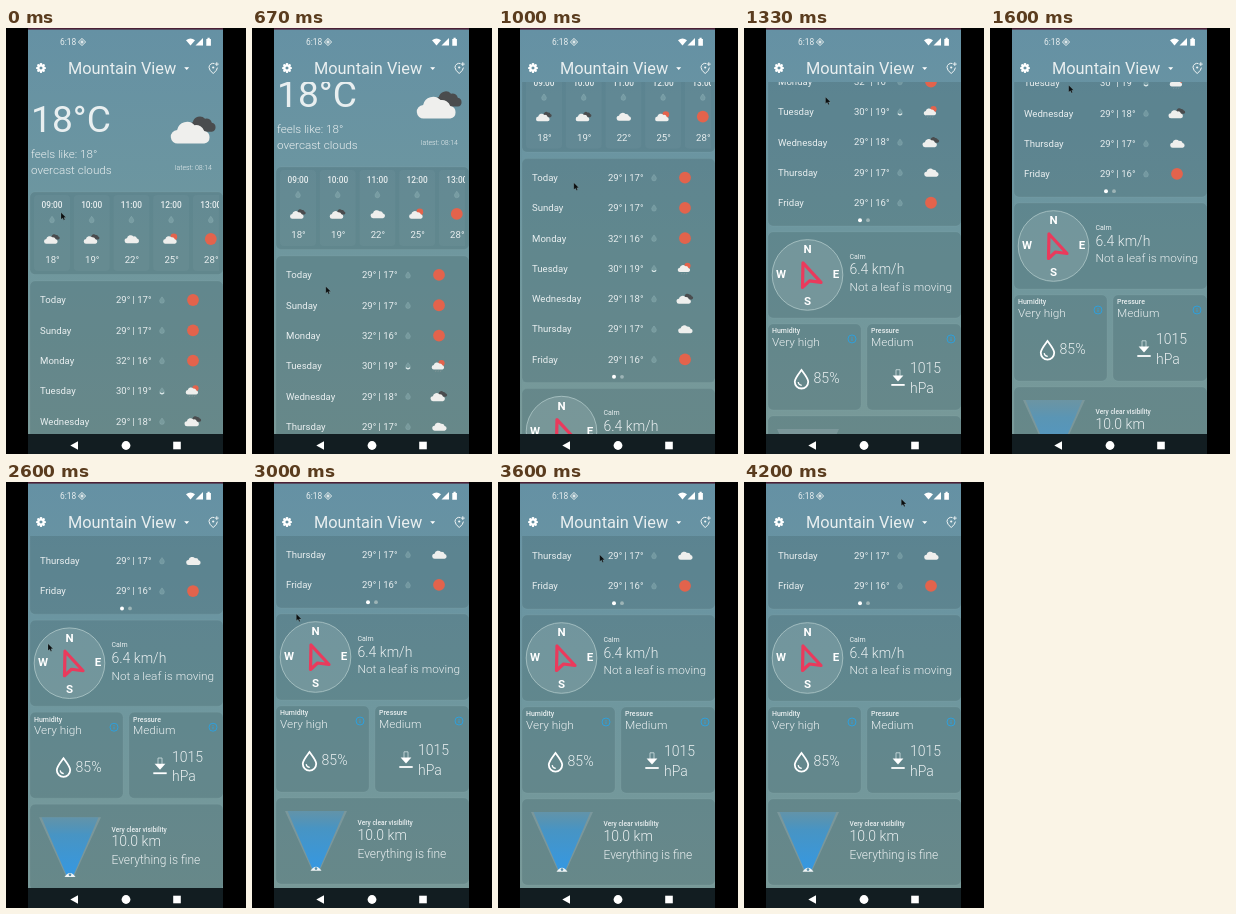
Animation of 240x426 px, one loop 4.27 s. Source, as an HTML page:

```html
<!DOCTYPE html>
<html lang="en">
<head>
<meta charset="utf-8">
<title>Weather</title>
<style>
html, body { margin: 0; width: 100%; height: 100%; overflow: hidden; background: #000; }
svg { display: block; width: 100vw; height: 100vh; }
text { font-family: Roboto, "Open Sans", sans-serif; fill: #e9eff0; white-space: pre; }
.card { fill: #3f6068; fill-opacity: .3; stroke: #a5c4c4; stroke-opacity: .12; stroke-width: .8; }
</style>
</head>
<body>
<svg viewBox="0 0 240 426" preserveAspectRatio="none">
  <defs>
    <linearGradient id="sky" x1="0" y1="0" x2="0" y2="1">
      <stop offset="0" stop-color="#6591a4"/>
      <stop offset=".5" stop-color="#6e979f"/>
      <stop offset="1" stop-color="#789998"/>
    </linearGradient>
    <linearGradient id="beam" x1="0" y1="0" x2="0" y2="1">
      <stop offset="0" stop-color="#4a90b8" stop-opacity=".5"/>
      <stop offset=".3" stop-color="#4294c8" stop-opacity=".9"/>
      <stop offset="1" stop-color="#3598e2"/>
    </linearGradient>
    <clipPath id="view"><rect x="22" y="54" width="195" height="352"/></clipPath>
    <clipPath id="hours"><rect x="26" y="164" width="187" height="83"/></clipPath>
    <path id="cloud" d="M-13 11a7 7 0 0 1-1-14a10.5 10.5 0 0 1 18-5a9 9 0 0 1 10 6a6.6 6.6 0 0 1 0 13z"/>
    <path id="drop" d="M0-3.8C1.8-1.4 2.8-.2 2.8 1.1A2.8 2.8 0 0 1-2.8 1.1C-2.8-.2-1.8-1.4 0-3.8z"/>
  </defs>
  <rect width="240" height="426"/>
  <rect x="22" y="1" width="195" height="405" fill="url(#sky)"/>
  <rect x="22" y="0" width="195" height="1.6" fill="#4b2036"/>
  <g clip-path="url(#view)"><g id="page"></g></g>
  <g id="bars"></g>
  <path id="cursor" d="M0 0V6.8L1.7 5.4L2.8 7.7L3.8 7.2L2.9 5H5z" fill="#0a0e0f" stroke="#cfdcdc" stroke-opacity=".35" stroke-width=".4"/>
</svg>
<script>
const LOOP = 4270, STEPS = 64;
const $ = id => document.getElementById(id);

// y is the middle of the capital letters
const text = (s, x, y, size, { w = 300, anchor = 'start', fill = '#e9eff0' } = {}) =>
  `<text x="${x}" y="${y + size * .355}" font-size="${size}" font-weight="${w}" text-anchor="${anchor}" style="fill:${fill}">${s}</text>`;
const card = (x, y, w, h) => `<rect class="card" x="${x}" y="${y}" width="${w}" height="${h}" rx="5"/>`;
const at = (x, y, k, body) => `<g transform="translate(${x} ${y}) scale(${k})">${body}</g>`;
const circle = (x, y, r, attrs) => `<circle cx="${x}" cy="${y}" r="${r}" ${attrs}/>`;
const line = (d, color, width, extra = '') =>
  `<path d="${d}" fill="none" stroke="${color}" stroke-width="${width}" ${extra}/>`;

const WHITE = 'fill="#efefed"', RED = 'fill="#e3634c"';
const front = `<use href="#cloud" x="-3" y="3" ${WHITE}/>`;
const icons = {
  broken: (x, y, k) => at(x, y, k, `<use href="#cloud" transform="translate(9 -6) scale(.7)" fill="#4a4c4e"/>` + front),
  cloud: (x, y) => at(x + .6, y + .3, .36, `<use href="#cloud" ${WHITE}/>`),
  sun: (x, y) => circle(x, y, 5.9, RED),
  partly: (x, y) => at(x, y, .34, circle(8, -6, 10, RED) + front),
  rain: (x, y) => at(x, y - .8, .31, circle(8, -6, 10, RED) + front +
    line('M-10 18l-1 3M-2 18l-1 3M6 18l-1 3', '#d9c4c0', 2, 'stroke-opacity=".5"'))
};
const drop = (x, y) => at(x, y, .85, '<use href="#drop" fill="#9bbcc0" fill-opacity=".35" stroke="#a0c0c4" stroke-opacity=".5" stroke-width=".6"/>');
const info = (x, y) => circle(x, y, 4, 'fill="none" stroke="#2f9fda" stroke-width="1"') +
  line(`M${x} ${y - .6}V${y + 2.1}M${x} ${y - 2.1}v1`, '#2f9fda', 1);

function hero() {
  return text('18°C', 25, 91, 37.2, { w: 400 }) +
    text('feels like: 18°', 25, 125.5, 11.6) +
    text('overcast clouds', 25, 142, 11.7) +
    text('latest: 08:14', 206, 139.5, 7, { anchor: 'end' }) +
    icons.broken(187.6, 102, .97);
}

function hourly() {
  const rows = [['09:00', 'broken', 18], ['10:00', 'broken', 19], ['11:00', 'cloud', 22],
    ['12:00', 'partly', 25], ['13:00', 'sun', 28]];
  const cells = rows.map(([hour, icon, deg], i) => {
    const x = 46 + i * 39.7;
    return `<rect x="${x - 18}" y="167" width="36" height="76" rx="4" fill="#fff" fill-opacity=".03"/>` +
      text(hour, x, 177.5, 8.3, { w: 500, anchor: 'middle' }) + drop(x, 191.5) +
      icons[icon](x, 211, .34) + text(deg + '°', x + .5, 231.8, 9.6, { w: 400, anchor: 'middle' });
  });
  return card(24, 164, 193, 82.5) + `<g clip-path="url(#hours)">${cells.join('')}</g>`;
}

function daily() {
  const rows = [['Today', 29, 17, 'sun'], ['Sunday', 29, 17, 'sun'], ['Monday', 32, 16, 'sun'],
    ['Tuesday', 30, 19, 'rain'], ['Wednesday', 29, 18, 'broken'], ['Thursday', 29, 17, 'cloud'], ['Friday', 29, 16, 'sun']];
  return card(24, 253, 193, 224) + rows.map(([day, hi, lo, icon], i) => {
    const y = 272 + i * 30.3;
    const wet = icon === 'rain' ? line(`M153.9 ${y + 1.8}q2.1 2.4 4.2 0`, '#e4eeee', 1.1) : '';
    return text(day, 34, y, 9.6, { w: 400 }) + text(`${hi}° | ${lo}°`, 110, y, 9.5, { w: 400 }) +
      drop(156, y) + wet + icons[icon](187, y, .36);
  }).join('') + circle(116, 471.2, 2, 'fill="#fff"') + circle(124, 471.2, 1.9, 'fill="#9db4b6"');
}

function wind() {
  const marks = [['N', 63.5, 500.3], ['E', 92, 525], ['S', 63.5, 552], ['W', 37, 525]];
  return card(24, 483, 193, 86) +
    circle(63.5, 526, 35.3, 'fill="#b5cccc" fill-opacity=".22" stroke="#b9d0d0" stroke-opacity=".7" stroke-width="1"') +
    marks.map(([s, x, y]) => text(s, x, y, 11.5, { w: 700, anchor: 'middle', fill: '#fff' })).join('') +
    line('M59 514L58.5 538.5L65.5 532L77 533.5z', '#ea3a5c', 3.2, 'stroke-linejoin="round"') +
    text('Calm', 105.5, 507.3, 7, { w: 400 }) + text('6.4 km/h', 105.5, 520.6, 14) +
    text('Not a leaf is moving', 105.5, 538.3, 11.8);
}

function gauges() {
  return card(24, 575, 93, 86) + card(123, 575, 94, 86) +
    text('Humidity', 28, 581.8, 7, { w: 500 }) + text('Very high', 28, 592.7, 11.8) + info(108, 590) +
    at(57.5, 630.2, 2.4, '<use href="#drop" fill="none" stroke="#fff" stroke-width=".75"/>' +
      line('M-1.4 1.2Q-1.2 2.5.1 2.6', '#fff', .5)) +
    text('85%', 69.5, 629.3, 14.1) +
    text('Pressure', 127, 581.8, 7, { w: 500 }) + text('Medium', 127, 592.7, 11.8) + info(207, 590) +
    line('M152 627v-6.2h4v6.2', '#c6d6d8', .9) +
    '<path d="M148.6 626.5h10.8l-5.4 6z" fill="#fff"/>' +
    line('M147.3 636h13.4', '#fff', 1.8) +
    text('1015', 166, 619.4, 14) + text('hPa', 166, 639.2, 14);
}

function visibility() {
  return card(24, 667, 193, 86) +
    '<path d="M33 680H95L68.5 738H59.5z" fill="#8fa8ac" fill-opacity=".5"/>' +
    '<path id="cone" d="M35.5 680H92.5L67.5 738H60.5z" fill="url(#beam)"/>' +
    '<path d="M58.5 739.8Q64 731.5 69.5 739.8z" fill="#f0f5f6"/>' + circle(64, 737.6, 1.3, 'fill="#5d8fa8"') +
    text('Very clear visibility', 105.5, 692, 6.6, { w: 500 }) +
    text('10.0 km', 105.5, 704.3, 14) + text('Everything is fine', 105.5, 722.4, 12);
}

function bars() {
  const teeth = Array.from({ length: 8 }, (_, i) =>
    `<rect x="-1.1" y="-5.2" width="2.2" height="3" rx=".5" fill="#fff" transform="rotate(${i * 45})"/>`).join('');
  return text('6:18', 54, 14, 8.4, { w: 400 }) +
    '<path d="M76 10.2l3.8 3.8l-3.8 3.8l-3.8-3.8z" fill="#c5d5d9" fill-opacity=".5" stroke="#d4e0e3" stroke-width=".8"/>' +
    circle(76, 14, 1.2, 'fill="#e0eaec"') +
    '<path d="M180 12.2Q184.5 8.8 189 12.2L184.5 17.6z" fill="#fff"/>' +
    '<path d="M197 10v7.5h-7.5z" fill="#fff"/>' +
    '<path d="M200.3 11h1.2v-1.2h2.2v1.2h1.2v6.8h-4.6z" fill="#fff"/>' +
    at(35, 40, .95, teeth + circle(0, 0, 2.8, 'fill="none" stroke="#fff" stroke-width="2.4"')) +
    text('Mountain View', 62, 40, 16.35, { w: 400 }) +
    '<path d="M178.2 39.3h5l-2.5 2.6z" fill="#fff"/>' +
    line('M208.4 35.5A4.2 4.2 0 0 0 203 39.4Q203 42 207.2 45.6Q211.4 42 211.4 39.6', '#f2f6f6', 1) +
    circle(207.2, 39.5, 1.1, 'fill="#f2f6f6"') + line('M210.8 34.2v3.8M208.9 36.1h3.8', '#f2f6f6', .9) +
    '<rect x="22" y="406" width="195" height="20" fill="#121d21"/><path d="M64.3 417.5l7.7-4.3v8.6z" fill="#fff"/>' +
    circle(120, 417.5, 4.4, 'fill="#fff"') + '<rect x="167.2" y="413.7" width="7.6" height="7.6" fill="#fff"/>';
}

$('page').innerHTML = hero() + hourly() + daily() + wind() + gauges() + visibility();
$('bars').innerHTML = bars();

// [time, value...]
const scroll = [[0, 0], [560, 0], [600, 5], [667, 25], [800, 60], [1000, 122], [1130, 190], [1230, 241],
  [1334, 279], [1430, 298], [1530, 306], [1600, 308], [2200, 308], [2270, 310], [2400, 320], [2540, 340],
  [2670, 350], [2800, 351], [3070, 351], [3200, 350], [LOOP, 350]];
const pointer = [[0, 55, 184.5], [130, 57, 197], [330, 67, 258], [500, 72.5, 287], [560, 73, 287], [667, 73.8, 258.5],
  [1000, 75.8, 155], [1200, 79, 95], [1334, 81.5, 69], [1470, 82, 52], [1670, 77, 60], [1930, 52, 165],
  [2130, 39, 224], [2230, 39, 224], [2400, 40.2, 206.5], [2600, 42, 162], [2800, 43.5, 138], [3000, 44.3, 132],
  [3270, 50, 124], [3550, 92, 82], [3800, 138, 38], [4000, 154, 21], [4203, 157.3, 17]];
const beam = [[0, 0], [1340, 0], [1750, 1], [LOOP, 1]];

function sample(track, t) {
  const i = track.findIndex(p => p[0] > t);
  if (i < 0) return track[track.length - 1].slice(1);
  const a = track[i - 1], b = track[i], k = (t - a[0]) / (b[0] - a[0]);
  return a.slice(1).map((v, j) => v + (b[j + 1] - v) * k);
}

function draw(now) {
  const step = LOOP / STEPS;
  const t = Math.floor((now % LOOP + 4) / step) % STEPS * step;
  $('page').setAttribute('transform', `translate(0 ${-sample(scroll, t)[0]})`);
  $('cursor').setAttribute('transform', `translate(${sample(pointer, t).join(' ')})`);
  $('cone').setAttribute('opacity', sample(beam, t)[0]);
}

const start = performance.now();
function tick() {
  draw(performance.now() - start);
  requestAnimationFrame(tick);
}
tick();
</script>
</body>
</html>
```
